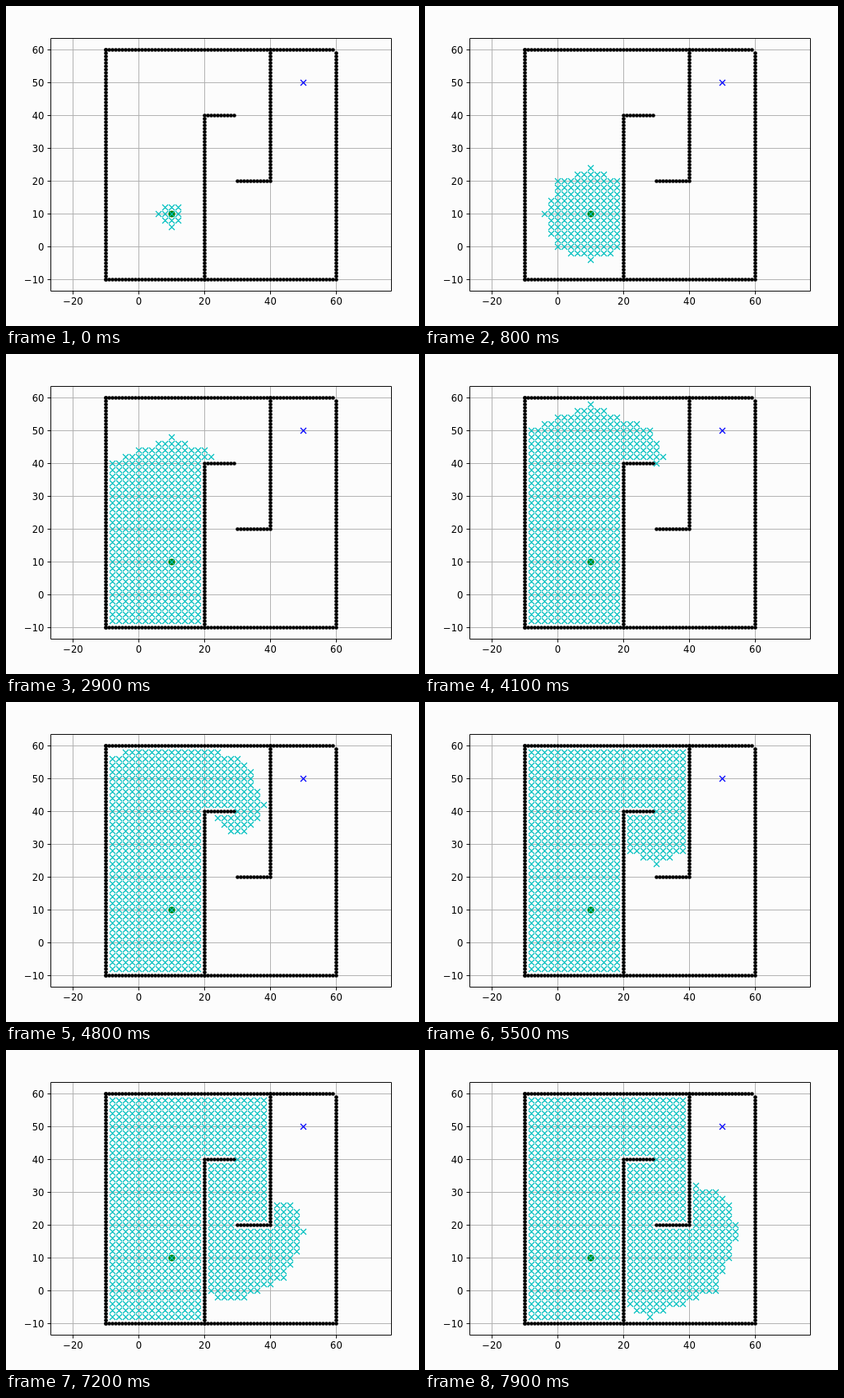
These frames come from a looping animation (502 by 390 pixels, 8 s). An HTML page:

```html
<!DOCTYPE html>
<html lang="en">
<head>
<meta charset="utf-8">
<title>Grid search</title>
<style>
  html, body { margin: 0; width: 100%; height: 100%; overflow: hidden; background: #fcfcfc; }
  svg { display: block; width: 502px; height: 390px; }
  text { font: 11.6px "DejaVu Sans", sans-serif; fill: #000; }
</style>
</head>
<body>
<svg id="plot" viewBox="0 0 502 390"></svg>
<script>
const svg = document.getElementById('plot');
const LOOP = 8000, STEP = 100;
const BOX = { left: 54.5, right: 468.5, top: 39.5, bottom: 347.5 };
const px = x => 161.5 + 4 * x;
const py = y => 293.5 - 4 * y;

function add(tag, attrs, text) {
  const el = document.createElementNS('http://www.w3.org/2000/svg', tag);
  for (const name in attrs) el.setAttribute(name, attrs[name]);
  if (text !== undefined) el.textContent = text;
  return svg.appendChild(el);
}
const stroke = (d, color, width) =>
  add('path', { d, fill: 'none', stroke: color, 'stroke-width': width });
const cross = ([x, y]) =>
  `M${px(x) - 3.5} ${py(y) - 3.5}l7 7m0-7l-7 7`;
const label = v => String(v).replace('-', '\u2212');

// Walls, one dot per unit
const walls = [];
function wall(x, y, dx, dy, count) {
  for (let i = 0; i < count; i++) walls.push([x + dx * i, y + dy * i]);
}
wall(-10, -10, 1, 0, 70);
wall(60, -10, 0, 1, 70);
wall(-10, 60, 1, 0, 70);
wall(-10, -10, 0, 1, 71);
wall(20, -10, 0, 1, 50);
wall(20, 40, 1, 0, 10);
wall(40, 60, 0, -1, 40);
wall(30, 20, 1, 0, 11);

// Uniform-cost search on a grid of pitch 2; ties go to the lower row, then the left
function search(start, limit) {
  const key = (x, y) => x + ',' + y;
  const closed = new Set(walls.map(([x, y]) => key(x, y)));
  const open = new Map([[key(...start), { x: start[0], y: start[1], cost: 0 }]]);
  const before = (a, b) =>
    Math.abs(a.cost - b.cost) > 1e-9 ? a.cost < b.cost :
    a.y !== b.y ? a.y < b.y : a.x < b.x;
  const order = [];
  while (open.size && order.length < limit) {
    let best = null;
    for (const node of open.values()) if (!best || before(node, best)) best = node;
    const id = key(best.x, best.y);
    open.delete(id);
    closed.add(id);
    order.push([best.x, best.y]);
    for (let dx = -1; dx <= 1; dx++) {
      for (let dy = -1; dy <= 1; dy++) {
        const x = best.x + 2 * dx, y = best.y + 2 * dy, next = key(x, y);
        if (closed.has(next)) continue;
        const cost = best.cost + Math.hypot(dx, dy);
        const known = open.get(next);
        if (!known || cost < known.cost) open.set(next, { x, y, cost });
      }
    }
  }
  return order;
}

// Axes and grid
let grid = '', ticks = '';
for (let v = -20; v <= 60; v += 20) {
  grid += `M${px(v)} ${BOX.top}V${BOX.bottom}`;
  ticks += `M${px(v)} ${BOX.bottom}v4`;
  add('text', { x: px(v), y: 364.2, 'text-anchor': 'middle' }, label(v));
}
for (let v = -10; v <= 60; v += 10) {
  grid += `M${BOX.left} ${py(v)}H${BOX.right}`;
  ticks += `M${BOX.left} ${py(v)}h-4`;
  add('text', { x: 46.4, y: py(v) + 4.3, 'text-anchor': 'end' }, label(v));
}
stroke(grid, '#b0b0b0', 0.93);
stroke(ticks, '#000', 0.93);

for (const [x, y] of walls) add('circle', { cx: px(x), cy: py(y), r: 2.32 });
add('circle', { cx: px(10), cy: py(10), r: 4.05, fill: '#008000' });
stroke(cross([50, 50]), '#0000ff', 1.16);
const visited = stroke('', '#00bfbf', 1.16);
stroke(`M${BOX.left} ${BOX.top}H${BOX.right}V${BOX.bottom}H${BOX.left}Z`, '#000', 0.93);

// Pace of the search: [tick, batches of ten]
const pace = [[0, 1], [16, 25], [36, 45], [41, 48], [55, 63], [79, 87]];
function batches(tick) {
  const i = pace.findIndex(([t]) => t >= tick);
  if (i === 0) return pace[0][1];
  const [t0, b0] = pace[i - 1], [t1, b1] = pace[i];
  return Math.round(b0 + (b1 - b0) * (tick - t0) / (t1 - t0));
}

const marks = search([10, 10], 871).map(cross);
let shown = -1;
function render(time) {
  const count = 10 * batches(Math.floor((time % LOOP) / STEP)) + 1;
  if (count === shown) return;
  shown = count;
  visited.setAttribute('d', marks.slice(0, count).join(''));
}

const begin = performance.now();
function loop() {
  render(performance.now() - begin);
  requestAnimationFrame(loop);
}
loop();
</script>
</body>
</html>
```
